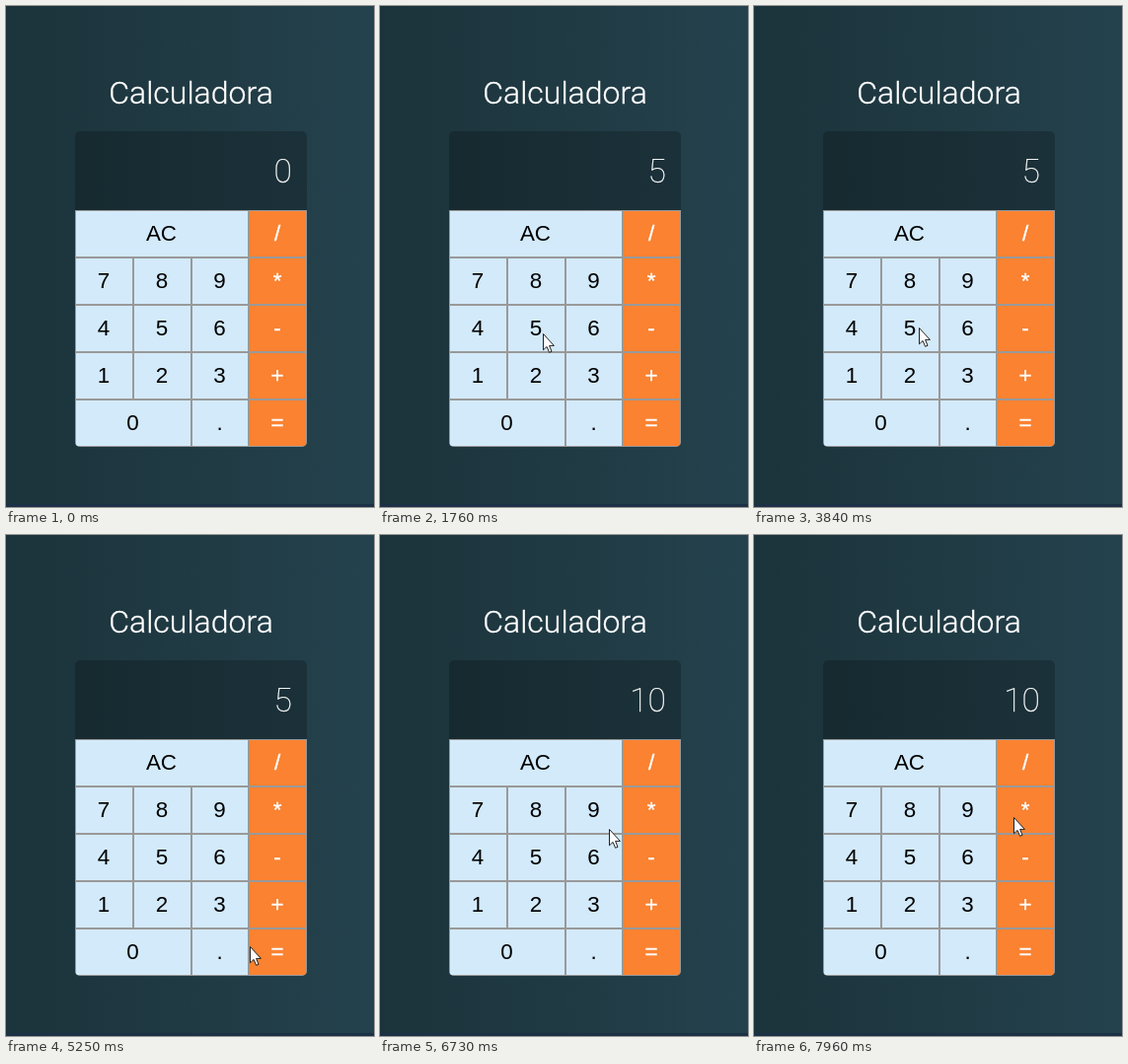
These frames come from a looping animation (373x508 px, 8000 ms). An HTML page:

```html
<!DOCTYPE html>
<html lang="pt">
<head>
<meta charset="utf-8">
<title>Calculadora</title>
<style>
  html, body { margin: 0; width: 100%; height: 100%; overflow: hidden; background: #203a43; }
  svg { display: block; width: 373px; height: 508px; }
  .title { font: 300 32px Roboto, sans-serif; fill: #fff; stroke: #fff; stroke-width: .3; text-anchor: middle; }
  .display { font: 100 33.6px Roboto, sans-serif; fill: #fff; stroke: #fff; stroke-width: .25; text-anchor: end; }
  .key rect { fill: #d3eafa; stroke: #999; }
  .key text { font: 22.4px "Liberation Sans", Arial, sans-serif; text-anchor: middle; }
  .key.operation rect { fill: #fa8231; }
  .key.operation text { fill: #fff; stroke: #fff; stroke-width: .4; }
  .key.active rect { fill: #ccc; }
  .key.operation.active rect { fill: #cd7131; }
</style>
</head>
<body>
<svg viewBox="0 0 373 508" xmlns="http://www.w3.org/2000/svg">
  <defs>
    <linearGradient id="backdrop">
      <stop offset="0" stop-color="#1b333b"/>
      <stop offset=".5" stop-color="#203a43"/>
      <stop offset="1" stop-color="#24424e"/>
    </linearGradient>
    <clipPath id="body"><rect x="70" y="127" width="235" height="320" rx="5"/></clipPath>
  </defs>
  <rect width="373" height="508" fill="url(#backdrop)"/>
  <rect y="505" width="373" height="3" fill="#1c3145"/>
  <text class="title" x="187.5" y="98.5">Calculadora</text>
  <g clip-path="url(#body)">
    <rect x="70" y="127" width="235" height="320" fill="#000" fill-opacity=".22"/>
    <text class="display" id="display" x="290" y="179">0</text>
    <g id="keys"></g>
  </g>
  <path id="cursor" d="M.5 .5V16.8L4.1 13.4L6.6 19.3L9 18.3L6.6 12.4H11.4Z" fill="#fff" stroke="#222"/>
</svg>
<script>
const LOOP = 8000, FIRST_TICK = 300, TICK = 77.37;
const ROWS = ["AC AC AC /", "7 8 9 *", "4 5 6 -", "1 2 3 +", "0 0 . ="];

// Cursor strokes between rests, timed in ticks
const ENTRY = [266, 486];
const MOVES = [
  { from: 0, until: 4, to: [209, 395] },
  { from: 9, until: 16, to: [165, 332] },
  { from: 23, until: 28, to: [270, 372] },
  { from: 41, until: 46, to: [167, 326] },
  { from: 60, until: 66, to: [287, 432] },
  { from: 68, until: 70, to: [278, 424] },
  { from: 77, until: 83, to: [232, 298] }
];
const SWIRL = { from: 83, until: 99 };

const PRESSES = [
  { key: "5", down: 18, up: 19 },
  { key: "+", down: 31, up: 33 },
  { key: "+", down: 37, up: 39 },
  { key: "5", down: 51, up: 52 },
  { key: "=", down: 72, up: 73 }
];

const byId = id => document.getElementById(id);
const lerp = (a, b, u) => a + (b - a) * u;
const easeOut = u => 1 - (1 - u) ** 1.8;
const progress = (tick, { from, until }) => Math.min(1, Math.max(0, (tick - from) / (until - from)));
const columnEdge = column => Math.round(70 + 58.75 * column);
const keys = {};

function add(parent, name, attributes, text = "") {
  const node = document.createElementNS("http://www.w3.org/2000/svg", name);
  for (const key in attributes) node.setAttribute(key, attributes[key]);
  node.textContent = text;
  return parent.appendChild(node);
}

function buildKeys() {
  ROWS.forEach((row, r) => {
    const labels = row.split(" "), y = 207 + r * 48;
    new Set(labels).forEach(label => {
      const last = labels.lastIndexOf(label);
      const left = columnEdge(labels.indexOf(label)), right = columnEdge(last + 1);
      const group = add(byId("keys"), "g", { class: last === 3 ? "key operation" : "key" });
      add(group, "rect", { x: left + .5, y: y + .5, width: right - left - 1, height: 47 });
      add(group, "text", { x: (left + right - 1) / 2, y: y + 31 }, label);
      keys[label] = group;
    });
  });
}

// One slowing, drifting turn over the keypad
function swirl([x, y], tick) {
  const u = progress(tick, SWIRL), turn = easeOut(u) * Math.PI * 2.04;
  const phase = turn + Math.PI / 3;
  return [x + 33 * u - 19 * Math.sin(turn), y + 103 * (Math.cos(phase) - .5)];
}

function cursorAt(tick) {
  const rest = MOVES.reduce(([x, y], move) => {
    const u = progress(tick, move);
    return [lerp(x, move.to[0], u), lerp(y, move.to[1], easeOut(u))];
  }, ENTRY);
  return swirl(rest, tick).map(Math.round);
}

function draw(time) {
  const tick = Math.floor((time - FIRST_TICK + 20) / TICK);
  const [x, y] = cursorAt(tick);
  byId("cursor").setAttribute("transform", `translate(${x} ${y})`);
  byId("cursor").setAttribute("visibility", tick < 0 ? "hidden" : "visible");
  byId("display").textContent = tick < 19 ? "0" : tick < 73 ? "5" : "10";
  for (const label in keys) {
    const pressed = PRESSES.some(({ key, down, up }) => key === label && tick >= down && tick < up);
    keys[label].classList.toggle("active", pressed);
  }
}

function play() {
  draw(performance.now() % LOOP);
  requestAnimationFrame(play);
}

buildKeys();
play();
</script>
</body>
</html>
```
